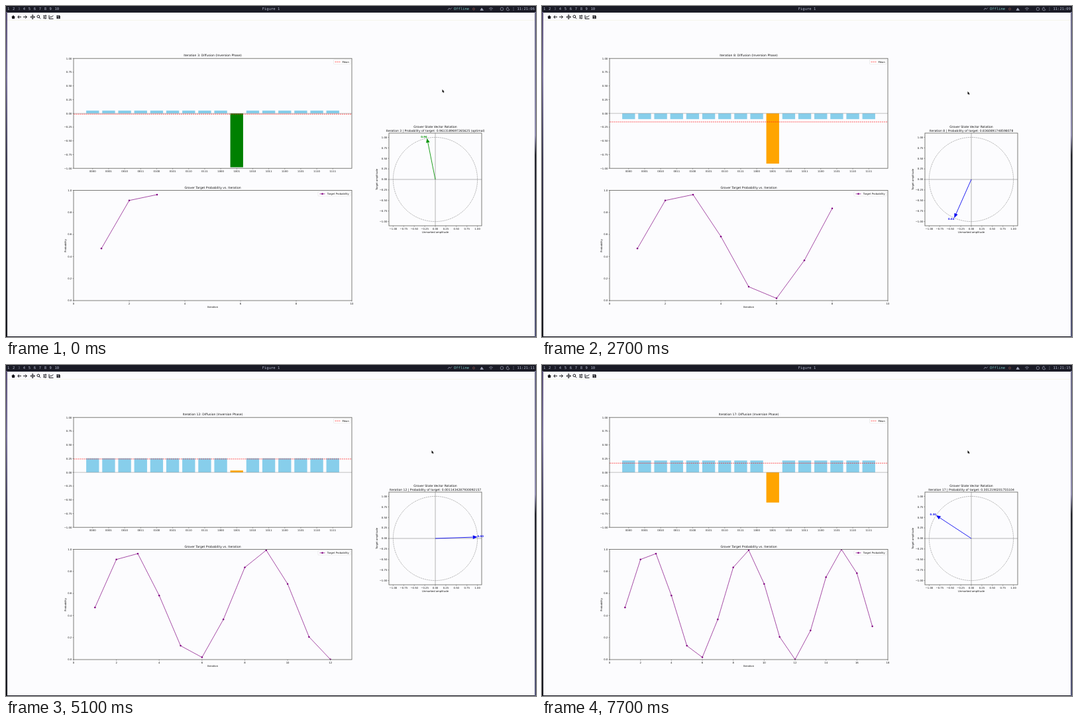
An HTML page that plays this animation: 800 by 500 pixels, repeating every 8 s.

```html
<!DOCTYPE html>
<html lang="en">
<head>
<meta charset="utf-8">
<title>Grover search</title>
<style>
  html, body { margin: 0; width: 100%; height: 100%; overflow: hidden; background: #fcfcfe; }
  svg { display: block; width: 800px; height: 500px; }
  text { font-family: "DejaVu Sans", sans-serif; fill: #111; text-rendering: geometricPrecision; white-space: pre; }
  .mono { font-family: "DejaVu Sans Mono", monospace; font-size: 5.5px; fill: #b4bad0; }
  .frame { fill: none; stroke: #5c5c58; stroke-width: .8; }
  .tick { stroke: #444; stroke-width: .6; }
  .icon { fill: none; stroke: #15151a; stroke-width: 1; }
  .tray { fill: none; stroke: #a0a4b8; stroke-width: .7; }
  .legend { fill: #fff; fill-opacity: .8; stroke: #dcdcdc; stroke-width: .5; }
</style>
</head>
<body>
<svg id="stage" viewBox="0 0 800 500" xmlns="http://www.w3.org/2000/svg">
  <defs>
    <linearGradient id="left" x2="0" y2="1">
      <stop offset="0" stop-color="#5a5078"/><stop offset=".2" stop-color="#77709a"/>
      <stop offset=".45" stop-color="#3a3850"/><stop offset="1" stop-color="#15161c"/>
    </linearGradient>
    <linearGradient id="right" x2="0" y2="1">
      <stop offset="0" stop-color="#6a6a88"/><stop offset=".38" stop-color="#8f8cae"/>
      <stop offset=".44" stop-color="#22242c"/><stop offset="1" stop-color="#55587a"/>
    </linearGradient>
    <clipPath id="probClip"><rect x="102" y="278.5" width="420" height="166.5"/></clipPath>
  </defs>

  <rect width="800" height="500" fill="#1a1b26"/>
  <rect y="9" width="2" height="491" fill="url(#left)"/>
  <rect x="798" y="9" width="2" height="491" fill="url(#right)"/>
  <rect x="2" y="10" width="796" height="489" fill="#fcfcfe"/>
  <path d="M2 21.5H798" stroke="#f4f4e6" stroke-width=".8"/>

  <g class="tray">
    <path d="M667 6L669 3L670.5 5L673 2.5"/>
    <circle cx="706" cy="4.5" r="1.5" stroke="#9a5a50"/>
    <path d="M716 6.5L718 3L720.5 6.5Z" fill="#a0a4b8"/>
    <path d="M729 4Q732 1 735 4M730.5 5.3Q732 4 733.5 5.3M732 6.2V7"/>
    <circle cx="748.5" cy="4.5" r="2.3"/>
    <path d="M758 2A2.5 2.5 0 1 0 760 5.5A2.5 2.5 0 0 1 758 2Z"/>
    <path d="M766 2V7" stroke-dasharray="1 1"/>
  </g>

  <g class="icon">
    <path d="M8 16.8L11 14L14 16.8H13V19.3H9V16.8Z" fill="#15151a" stroke="none"/>
    <path d="M23 16.6H18M20 14.3L17.7 16.6L20 18.9"/>
    <path d="M26 16.6H31M29.2 14.3L31.5 16.6L29.2 18.9"/>
    <path d="M37 16.6H43.5M40.2 13.3V19.9"/>
    <path d="M39 14.6L40.2 13.2L41.4 14.6M39 18.6L40.2 20L41.4 18.6M38.3 15.4L36.9 16.6L38.3 17.8M42.1 15.4L43.5 16.6L42.1 17.8" stroke-width=".8"/>
    <circle cx="48.8" cy="15.9" r="1.9"/><path d="M50.2 17.3L52 19.3"/>
    <path d="M56 14.5H61.5M56 16.6H61.5M56 18.7H61.5" stroke-width=".8"/>
    <path d="M59.8 13.6V15.4M57.7 15.7V17.5M59.2 17.8V19.6"/>
    <path d="M65 13.8V19.3H71.5M66 17.6L68 15.8L69 16.8L71.2 14.3"/>
    <path d="M76.5 14H80.5L81.7 15.2V19.3H76.5Z" fill="#15151a" stroke="none"/>
    <path d="M77.6 15.3H80M78.3 17.8H80" stroke="#fcfcfe"/>
  </g>

  <g id="plots"></g>
  <path id="cursor" d="M0 0V4.6L1.1 3.7L1.9 5.3L2.7 4.9L1.9 3.4H3.2Z" fill="#0c0c0c"/>
</svg>
<script>
const plots = document.getElementById('plots');
const cursor = document.getElementById('cursor');
const SMALL = 3.8, BIG = 4.56;

function add(tag, attrs, parent = plots) {
  const node = document.createElementNS('http://www.w3.org/2000/svg', tag);
  set(node, attrs);
  parent.appendChild(node);
  return node;
}
function set(node, attrs) {
  for (const key in attrs) node.setAttribute(key, attrs[key]);
}
function label(str, x, y, anchor = 'middle', size = SMALL, extra = {}, parent = plots) {
  const node = add('text', { x, y: y + size * .36, 'text-anchor': anchor, 'font-size': size, ...extra }, parent);
  node.textContent = str;
  return node;
}
function mono(str, x, anchor = 'start', style = '') {
  return label(str, x, 4.4, anchor, 5.5, { class: 'mono', style });
}
function line(x1, y1, x2, y2, attrs, parent = plots) {
  return add('line', { x1, y1, x2, y2, ...attrs }, parent);
}
const signed = v => v.toFixed(2).replace('-', '\u2212');
function xTick(str, x, y, parent) {
  line(x, y, x, y + 1.4, { class: 'tick' }, parent);
  label(str, x, y + 4.7, 'middle', SMALL, {}, parent);
}
function yTick(str, x, y) {
  line(x - 1.4, y, x, y, { class: 'tick' });
  label(str, x - 2.7, y, 'end');
}
function vertical(str, x, y) {
  label(str, x, y, 'middle', SMALL, { transform: `rotate(-90 ${x} ${y})` });
}
function box(x, y, width, height) {
  add('rect', { x, y, width, height, class: 'frame' });
}

// Status bar
for (let i = 1; i <= 10; i++) mono(i, 2 + (i - 1) * 7.95, 'start', i === 3 ? 'fill:#6c7086' : '');
mono('Figure 1', 400, 'middle');
mono('Offline', 676, 'start', 'fill:#7cc8c4');
const clock = mono('', 798, 'end');

// Amplitude bars
const ZERO = 162.2, UNIT = 83;
const barX = i => 102 + 420 * (i + 1.19) / 17.38;
const bars = [];
for (let i = 0; i < 16; i++) {
  bars.push(add('rect', { x: barX(i - .4), width: 420 * .8 / 17.38 }));
  xTick(i.toString(2).padStart(4, '0'), barX(i), 245.2);
}
for (let v = -4; v <= 4; v++) yTick(signed(v / 4), 102, ZERO - v / 4 * UNIT);
line(102, ZERO, 522, ZERO, { stroke: '#808080', 'stroke-width': .5 });
const red = { stroke: '#ff2020', 'stroke-width': .7, 'stroke-dasharray': '2.1 .9' };
const meanLine = line(102, 0, 522, 0, red);
box(102, 79.2, 420, 166);
const barTitle = label('', 312, 74.8, 'middle', BIG);
add('rect', { x: 494.5, y: 81.2, width: 25.7, height: 6.6, rx: .8, class: 'legend' });
line(496.5, 84.5, 504.5, 84.5, red);
label('Mean', 507.5, 84.5, 'start');

// Probability curve
const probY = p => 445 - 166.5 * p;
for (let v = 0; v <= 5; v++) yTick((v / 5).toFixed(1), 102, probY(v / 5));
const xTicks = add('g', {});
const curve = add('g', { 'clip-path': 'url(#probClip)' });
box(102, 278.5, 420, 166.5);
label('Grover Target Probability vs. Iteration', 312, 274.6, 'middle', BIG);
label('Iteration', 312, 454.7);
vertical('Probability', 89.8, 362);
const legend = add('g', {});
add('rect', { x: 471, y: 280.4, width: 49.2, height: 6.6, rx: .8, class: 'legend' }, legend);
const purple = '#800080';
line(473.5, 283.8, 481.5, 283.8, { stroke: purple, 'stroke-width': .7 }, legend);
add('circle', { cx: 477.5, cy: 283.8, r: 1.25, fill: purple }, legend);
label('Target Probability', 484.7, 283.8, 'start', SMALL, {}, legend);

// State vector
const CX = 648, CY = 262, R = 63.6;
const gray = { stroke: '#858585', 'stroke-width': .6 };
add('circle', { cx: CX, cy: CY, r: R, fill: 'none', ...gray, 'stroke-dasharray': '2.1 .9' });
line(CX - 70, CY, CX + 70, CY, gray);
line(CX, CY - 70, CX, CY + 70, gray);
for (let v = -4; v <= 4; v++) {
  xTick(signed(v / 4), CX + v / 4 * R, 332);
  yTick(signed(v / 4), 578, CY - v / 4 * R);
}
box(578, 192, 140, 140);
label('Unmarked amplitude', CX, 341.8);
vertical('Target amplitude', 560, CY);
label('Grover State Vector Rotation', CX, 182.3, 'middle', BIG);
const vecTitle = label('', CX, 188, 'middle', BIG);
const shaft = line(CX, CY, CX, CY, { 'stroke-width': .9 });
const head = add('path', {});
const vecLabel = label('', 0, 0, 'middle', SMALL, { 'font-weight': 'bold' });

// Amplitudes after each Grover step: target, others
const states = [{ t: .25, o: .25 }];
for (let k = 1; k <= 17; k++) {
  const { t, o } = states[k - 1], mean = (15 * o - t) / 16;
  states.push({ t: 2 * mean + t, o: 2 * mean - o });
}
const prob = k => states[k].t ** 2;

function drawBars(k) {
  const flip = k % 2 ? -1 : 1, { t, o } = states[k];
  bars.forEach((bar, i) => {
    const target = i === 9, h = flip * (target ? t : o) * UNIT;
    const fill = !target ? '#87ceeb' : k === 3 ? '#008000' : '#ffa500';
    set(bar, { y: ZERO - Math.max(h, 0), height: Math.abs(h), fill });
  });
  const y = ZERO - flip * (15 * o + t) / 16 * UNIT;
  set(meanLine, { y1: y, y2: y });
  barTitle.textContent = `Iteration ${k}: Diffusion (Inversion Phase)`;
}

function drawCurve(k) {
  const max = Math.max(10, k + 1), px = i => 102 + 420 * i / max;
  xTicks.replaceChildren();
  curve.replaceChildren();
  for (let i = 0; i <= max; i += 2) xTick(i, px(i), 445, xTicks);
  const points = [];
  for (let i = 1; i <= k; i++) {
    points.push(`${px(i)},${probY(prob(i))}`);
    add('circle', { cx: px(i), cy: probY(prob(i)), r: 1.25, fill: purple }, curve);
  }
  add('polyline', { points: points.join(' '), fill: 'none', stroke: purple, 'stroke-width': .7 }, curve);
  // The legend dodges a peak in the right corner
  set(legend, { transform: `translate(${[9, 15, 16].includes(k) ? -367.5 : 0} 0)` });
}

function drawVector(k) {
  const dx = states[k].o * Math.sqrt(15), dy = -states[k].t;
  const x = CX + dx * R, y = CY + dy * R, bx = x - dx * 6.8, by = y - dy * 6.8;
  const color = k === 3 ? '#0a960a' : '#0a0af0', w = 2.8;
  set(shaft, { x2: bx, y2: by, stroke: color });
  set(head, { d: `M${x} ${y}L${bx - dy * w} ${by + dx * w}L${bx + dy * w} ${by - dx * w}Z`, fill: color });
  set(vecLabel, { x: x + Math.sign(dx) * 4.6, y: y + Math.sign(dy) * 1.7 + SMALL * .36, style: `fill:${color}` });
  vecLabel.textContent = prob(k).toFixed(2);
  vecTitle.textContent = `Iteration ${k} | Probability of target: ${prob(k)}${k === 3 ? ' (optimal)' : ''}`;
}

const steps = [500, 1100, 1600, 2100, 2700, 3200, 3800, 4300, 4800, 5400, 6000, 6600, 7100, 7700];
const seconds = [[300, 7], [1300, 8], [2300, 9], [3300, 10], [4400, 11], [5400, 12], [6400, 14], [7400, 15]];
let shown = 0;

function tick() {
  const t = performance.now() % 8000;
  const k = 3 + steps.filter(s => t >= s).length;
  if (k !== shown) {
    shown = k;
    drawBars(k);
    drawCurve(k);
    drawVector(k);
  }
  const sec = seconds.reduce((s, [at, v]) => t >= at ? v : s, 6);
  clock.textContent = '11:21:' + String(sec).padStart(2, '0');
  const p = Math.min(1, Math.max(0, (Math.floor(t / 100) - 1) / 4));
  set(cursor, { transform: `translate(${658.5 - 16 * p} ${126 + 3 * p})` });
  requestAnimationFrame(tick);
}
tick();
</script>
</body>
</html>
```
